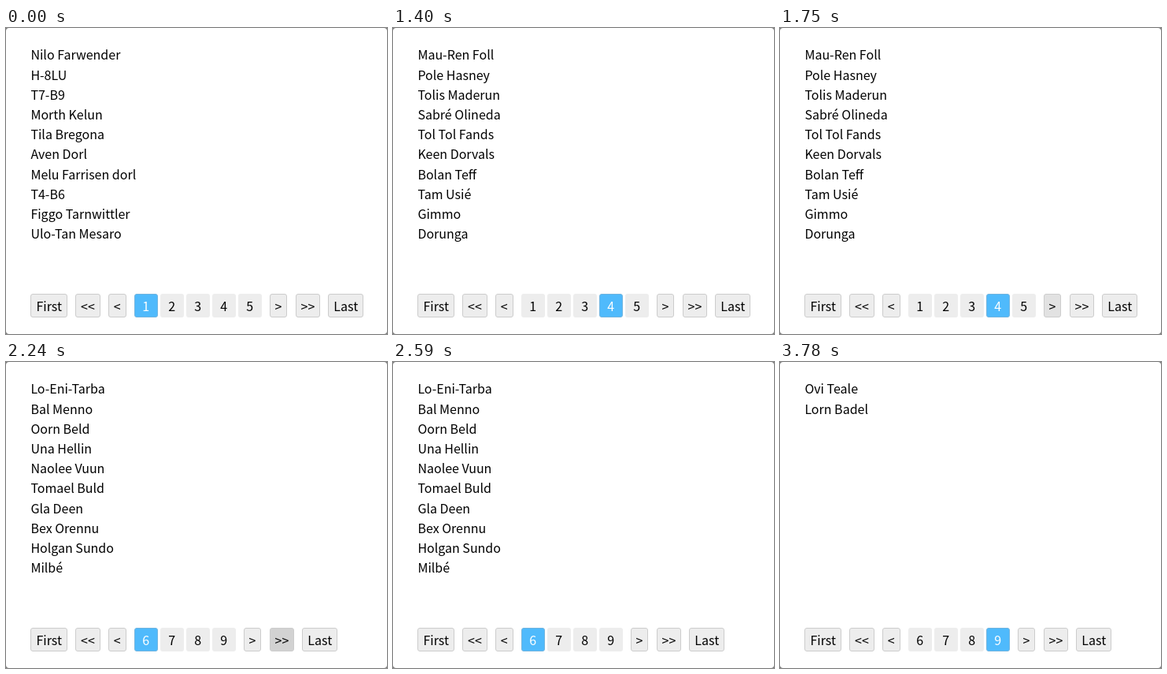
These frames come from a looping animation (484x388 px, 4.9 s). An HTML page:

```html
<!DOCTYPE html>
<html lang="en">
<head>
<meta charset="utf-8">
<title>Pagination</title>
<style>
html, body { margin: 0; width: 100%; height: 100%; overflow: hidden; background: #777; }
#card {
  position: relative; width: 484px; height: 388px; overflow: hidden;
  background: #fff; border-radius: 4px; color: #000;
  font: 16px "Noto Sans CJK JP", "Noto Sans CJK SC", "Noto Sans CJK", "Noto Sans", sans-serif;
}
#list { position: absolute; left: 31.4px; top: 21.4px; line-height: 25.2px; white-space: pre; }
.btn {
  position: absolute; top: 337px; height: 30px; line-height: 30px; box-sizing: border-box;
  border-radius: 3px; background: #ededed; text-align: center; white-space: nowrap;
}
.nav, .active { border: 1px solid #ccc; line-height: 28px; }
.active { background: #4fbafc; border-color: #72b4de; color: #fff; }
.half { background: #e2e2e2; }
.hover { background: #d2d2d2; }
</style>
</head>
<body>
<div id="card"><div id="list"></div><div id="pager"></div></div>
<script>
const LOOP = 4900;
const PAGES = {
  1: "Nilo Farwender,H-8LU,T7-B9,Morth Kelun,Tila Bregona,Aven Dorl,Melu Farrisen dorl,T4-B6,Figgo Tarnwittler,Ulo-Tan Mesaro",
  2: "Elodan Farwender,Dolruff Marben,Grumbolla,Ben Tavo,Plonda,Mubbo Ferilitic Taule,Hodge Carrilen,Tav Melo Burdens,Nuba,Serbolane",
  4: "Mau-Ren Foll,Pole Hasney,Tolis Maderun,Sabré Olineda,Tol Tol Fands,Keen Dorvals,Bolan Teff,Tam Usié,Gimmo,Dorunga",
  6: "Lo-Eni-Tarba,Bal Menno,Oorn Beld,Una Hellin,Naolee Vuun,Tomael Buld,Gla Deen,Bex Orennu,Holgan Sundo,Milbé",
  8: "Runa Fo,Deel Mo,Helonda Bi,T6-L28,Gol Bandur,Len Doll,Broon La,Thornius,Morffil,Dolmus Carrilen",
  9: "Ovi Teale,Lorn Badel"
};

// start time, page, pointed-at button, its shade
const STEPS = [
  [0, 1], [700, 2], [1400, 4],
  [1750, 4, ">", "half"], [2030, 4, ">>", "half"], [2170, 4, ">>", "hover"],
  [2240, 6, ">>", "hover"], [2450, 6], [3080, 8], [3780, 9]
];
const PAGES_LEFT = 162.6, PITCH = 33;

const list = document.getElementById("list");
const pager = document.getElementById("pager");

function addButton(label, x, width, classes) {
  const el = document.createElement("div");
  el.className = "btn " + classes;
  el.style.left = x + "px";
  el.style.width = width + "px";
  el.textContent = label;
  pager.append(el);
}

function show([, page, pointed, shade]) {
  list.textContent = PAGES[page].split(",").join("\n");
  pager.replaceChildren();

  const nav = (label, x, width) =>
    addButton(label, x, width, "nav " + (label === pointed ? shade : ""));
  const first = page > 5 ? 6 : 1;
  const count = page > 5 ? 4 : 5;
  const end = PAGES_LEFT + count * PITCH;

  nav("First", 31.4, 46.6);
  nav("<<", 88, 31.8);
  nav("<", 129.8, 22.9);
  for (let i = 0; i < count; i++) {
    addButton(first + i, PAGES_LEFT + i * PITCH, 30, first + i === page ? "active" : "");
  }
  nav(">", end + 7, 22.9);
  nav(">>", end + 39.9, 31.8);
  nav("Last", end + 81.7, 45);
}

let current;
const start = performance.now();

function tick() {
  const t = (performance.now() - start) % LOOP;
  const step = STEPS.findLast(s => s[0] <= t);
  if (step !== current) show(current = step);
  requestAnimationFrame(tick);
}
tick();
</script>
</body>
</html>
```
